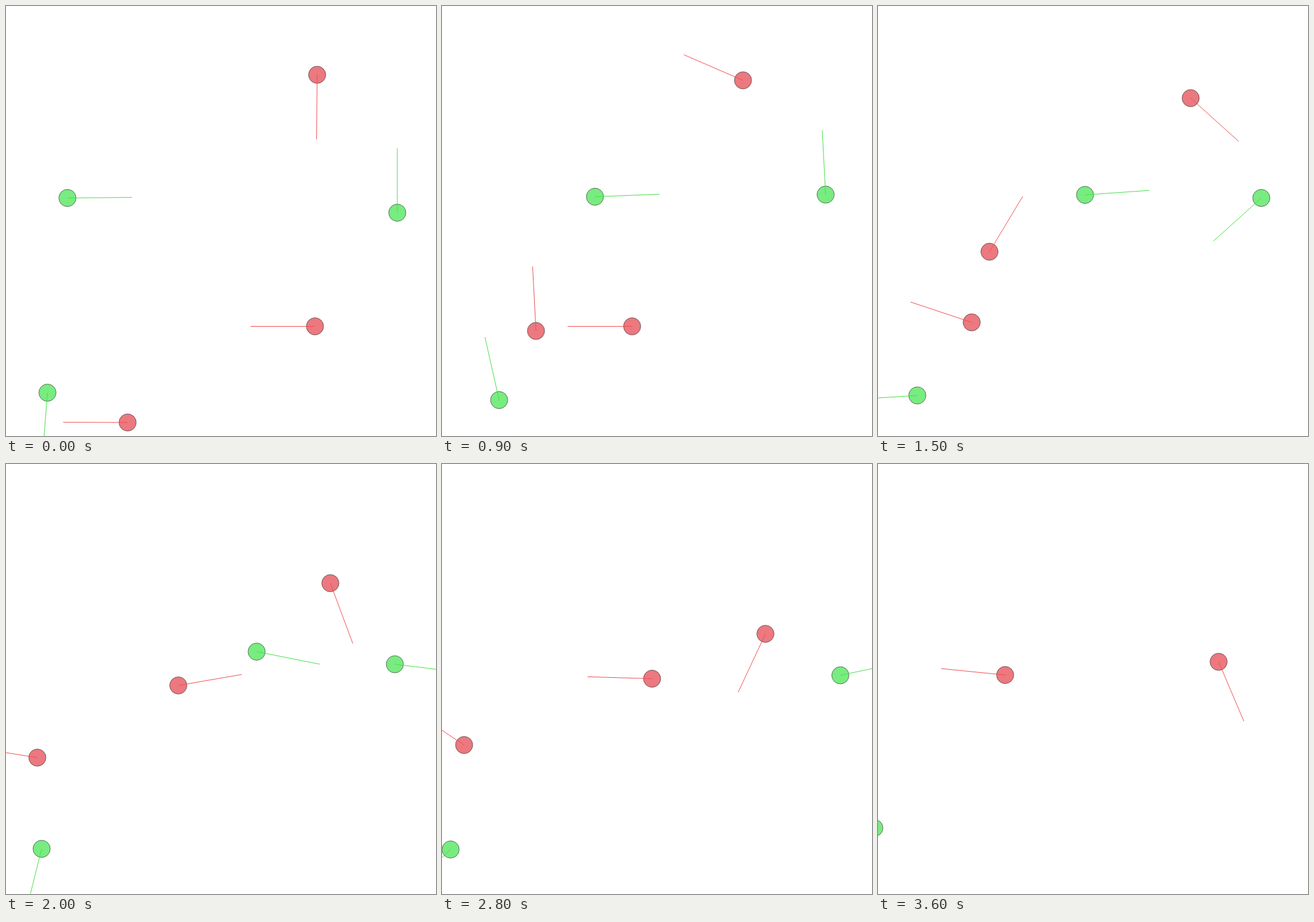
An HTML page with a canvas for the animation above (3.7 s loop, 700 by 700 pixels).

```html
<!DOCTYPE html>
<html>
<head>
<meta charset="utf-8">
<style>
html, body { margin: 0; height: 100%; overflow: hidden; background: #fff; }
canvas { display: block; }
</style>
</head>
<body>
<canvas id="stage" width="700" height="700"></canvas>
<script>
const ctx = document.getElementById('stage').getContext('2d');
const STEP = 100, STEPS = 37, RADIUS = 14, FEELER = 105;
const RED = { fill: '#ec7880', line: '#f25050' };
const GREEN = { fill: '#78ec80', line: '#48e048' };

// Waypoint times in steps; each waypoint is x, y, heading in degrees.
const times = [0, 5, 9, 15, 20, 24, 28, 36];
const agents = [
  { look: GREEN, path: [[100, 312.5, -0.5], [181, 312.5, 0], [249, 310.5, -2.2],
    [337, 307.5, -4], [408, 305.5, 11.2], [446, 318, 20]] },
  { look: GREEN, path: [[637, 336.5, -90], [631, 321.5, -160.5], [624.5, 307, -93],
    [624, 312.5, 138], [633, 326, 7], [640, 336, -3], [648.5, 344, -12], [722, 328, -12]] },
  { look: GREEN, path: [[67.5, 629.5, 94.5], [85.5, 644.5, 11], [93, 641.5, -102.7],
    [64, 634, -183.6], [58, 626.5, -256], [36, 628, -210], [14, 627.5, -223], [-6, 592.5, -160]] },
  { look: RED, path: [[506.5, 112, 90.5], [506.5, 121.5, -89], [490, 121, -156.6],
    [509, 150, -318], [528, 194, -290.4], [530, 215, -268], [526.5, 276.5, -245], [554.5, 322, -293]] },
  { look: RED, path: [[503, 521.5, 180], [411, 521.5, 180], [309.5, 521.5, 180],
    [152.5, 515, 198.4], [51, 478, 189], [38, 466, 200], [36, 457.5, 213.7], [-40, 430, 215]] },
  { look: RED, path: [[198, 678, 180.2], [162, 622.5, 257.6], [153, 529, 267],
    [181.5, 400, 301], [280.5, 360.5, 350.2], [374, 352, 265], [342, 349.5, 181.7], [207, 343.5, 185.7]] }
];

function slope(path, i, axis) {
  const a = Math.max(i - 1, 0), b = Math.min(i + 1, path.length - 1);
  return (path[b][axis] - path[a][axis]) / (times[b] - times[a]);
}

// Cubic Hermite curve through the waypoints
function glide(path, i, u, axis) {
  const span = times[i + 1] - times[i], v = 1 - u;
  return path[i][axis] * v * v * (1 + 2 * u) + path[i + 1][axis] * u * u * (3 - 2 * u) +
    span * u * v * (slope(path, i, axis) * v - slope(path, i + 1, axis) * u);
}

function drawAgent({ look, path }, step) {
  const last = times[path.length - 1];
  if (step > last || (step === last && path.length < times.length)) return;
  let i = 0;
  while (i < path.length - 2 && step >= times[i + 1]) i++;
  const u = (step - times[i]) / (times[i + 1] - times[i]);
  const x = glide(path, i, u, 0), y = glide(path, i, u, 1);
  const angle = (path[i][2] + (path[i + 1][2] - path[i][2]) * u) * Math.PI / 180;

  ctx.beginPath();
  ctx.arc(x, y, RADIUS, 0, Math.PI * 2);
  ctx.fillStyle = look.fill;
  ctx.fill();
  ctx.strokeStyle = 'rgba(60, 60, 60, 0.7)';
  ctx.stroke();

  ctx.beginPath();
  ctx.moveTo(x, y);
  ctx.lineTo(x + FEELER * Math.cos(angle), y + FEELER * Math.sin(angle));
  ctx.strokeStyle = look.line;
  ctx.stroke();
}

function render() {
  const step = Math.floor(performance.now() / STEP) % STEPS;
  ctx.fillStyle = '#fff';
  ctx.fillRect(0, 0, 700, 700);
  ctx.lineWidth = 1;
  for (const agent of agents) drawAgent(agent, step);
  requestAnimationFrame(render);
}
render();
</script>
</body>
</html>
```
